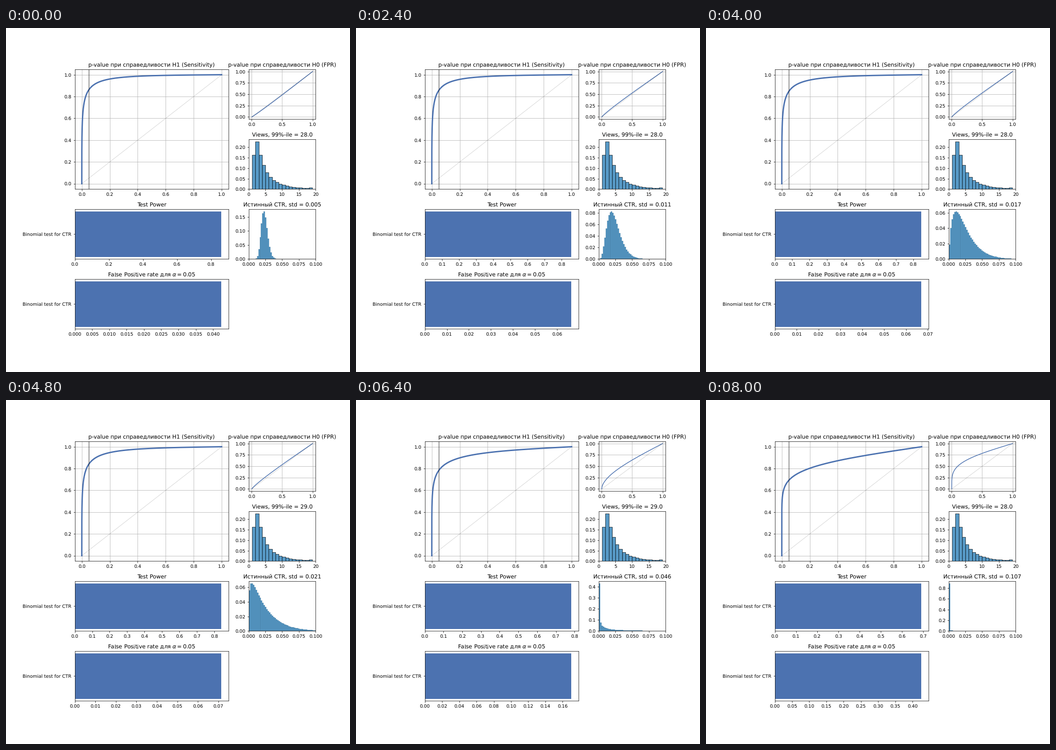
A matplotlib script for the animation above (8800 ms loop, 748x748 px).

```python
from math import erf, lgamma

import matplotlib.pyplot as plt
import numpy as np
from matplotlib.animation import FuncAnimation

plt.rcParams["text.hinting"] = "none"

SIZE, DPI = 748, 72
INTERVAL = 800
BLUE, HIST = "#4c72b0", (0.122, 0.467, 0.706, 0.75)
TEST = "Binomial test for CTR"

# One step per beta prior strength, with its simulated false positive rate
STRENGTH = [1000, 500, 300, 200, 100, 75, 50, 20, 10, 5, 1.03]
FPR = [.0424, .0585, .053, .0665, .0615, .067, .0714, .11, .17, .237, .4254]
HEAVY_TAIL = {1, 6, 8}  # steps whose views percentile rounds up to 29

MEAN_CTR = 0.0238
EFFECT = 3.05      # shift of the test statistic under H1
INFLATION = 10.5   # extra variance per unit of CTR correlation
ALPHA_Z = 1.96

phi = np.vectorize(lambda z: 0.5 * (1 + erf(z / 2 ** 0.5)))
T = np.linspace(5, 0, 800)
TWO_SIDED = 2 * phi(-T)


def reject_rate(t, shift, scale):
    """P(|statistic| > t) for a normal statistic."""
    return phi((shift - t) / scale) + phi((-shift - t) / scale)


def views_hist():
    """Share of floor(lognormal(1, 1)) + 1 in unit bins from 1 to 19."""
    n = np.arange(1, 20)
    cdf = phi(np.log(n) - 1)
    share = np.diff(np.r_[0, cdf]) / cdf[-1]
    share[-2] += share[-1]
    return n[:-1], share[:-1]


def beta_hist(k, shown=49, bins=147):
    """Binned beta density, integrated in u = x**a to tame the pole at 0."""
    a, b = MEAN_CTR * k, (1 - MEAN_CTR) * k
    step = 0.1 / shown
    edges = step * np.arange(bins + 1)
    u = edges ** a
    s = u[:-1, None] + np.diff(u)[:, None] * (np.arange(200) + 0.5) / 200
    tail = ((1 - s ** (1 / a)) ** (b - 1)).mean(axis=1)
    share = np.exp(lgamma(a + b) - lgamma(a + 1) - lgamma(b)) * np.diff(u) * tail
    return edges[:shown], (share / share.sum())[:shown], step


fig = plt.figure(figsize=(SIZE / DPI, SIZE / DPI), dpi=DPI, facecolor="white")
grid = fig.add_gridspec(4, 3, left=0.2, right=0.9, bottom=0.125, top=0.88,
                        wspace=0.3, hspace=0.4)
ax_h1 = fig.add_subplot(grid[:2, :2])
ax_h0 = fig.add_subplot(grid[0, 2])
ax_views = fig.add_subplot(grid[1, 2])
ax_power = fig.add_subplot(grid[2, :2])
ax_ctr = fig.add_subplot(grid[2, 2])
ax_fpr = fig.add_subplot(grid[3, :2])


def draw_curve(ax, shift, scale, width, title):
    ax.plot(np.r_[0, TWO_SIDED], np.r_[0, reject_rate(T, shift, scale)],
            color=BLUE, lw=width)
    ax.plot([0, 1], [0, 1], color="black", lw=0.8, alpha=0.2)
    ax.grid(True)
    ax.set_title(title)


def draw_bar(ax, value, title):
    ax.barh([TEST], [value], color=BLUE)
    ax.set_title(title)


def draw_hist(ax, left, share, step, edge, xmax, title):
    ax.bar(left, share, width=step, align="edge", color=HIST,
           edgecolor="black", linewidth=edge)
    ax.set_xlim(0, xmax)
    ax.set_ylim(0, 1.05 * max(share))
    ax.set_title(title)


def update(i):
    for ax in fig.axes:
        ax.clear()
    k = STRENGTH[i]
    scale_h1 = (1 + INFLATION / (k + 1)) ** 0.5
    scale_h0 = ALPHA_Z / np.interp(FPR[i], TWO_SIDED, T)
    std = (MEAN_CTR * (1 - MEAN_CTR) / (k + 1)) ** 0.5

    draw_curve(ax_h1, EFFECT, scale_h1, 3,
               "p-value при справедливости H1 (Sensitivity)")
    ax_h1.axvline(0.05, color="black", lw=0.8)
    draw_curve(ax_h0, 0, scale_h0, 1.5,
               "p-value при справедливости H0 (FPR)")

    draw_hist(ax_views, *views_hist(), 1, 0.73, 20,
              f"Views, 99%-ile = {28 + (i in HEAVY_TAIL):.1f}")
    draw_hist(ax_ctr, *beta_hist(k), 0.1, 0.1,
              f"Истинный CTR, std = {std:.3f}")

    draw_bar(ax_power, float(reject_rate(ALPHA_Z, EFFECT, scale_h1)),
             "Test Power")
    draw_bar(ax_fpr, FPR[i], r"False Positive rate для $\alpha = 0.05$")
    return []


anim = FuncAnimation(fig, update, frames=len(STRENGTH), interval=INTERVAL,
                     init_func=lambda: [], repeat=True, repeat_delay=0)
plt.show()
```
